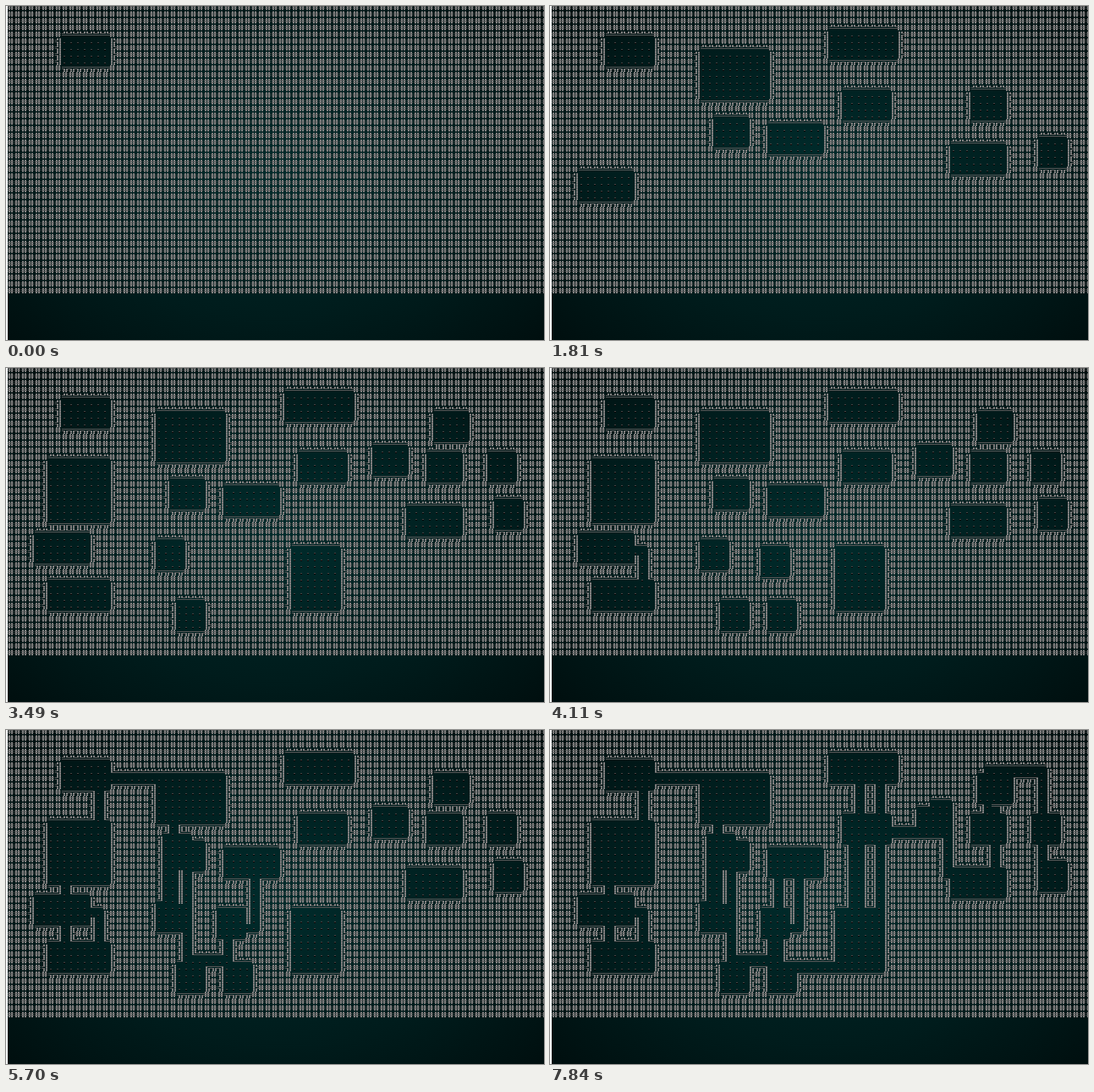
Write an HTML page with a canvas that moves like this. It is 636 px wide and 396 px high and loops after 8 s.

```html
<!DOCTYPE html>
<html lang="en">
<head>
<meta charset="utf-8">
<title>Dungeon generation</title>
<style>
  html, body { margin: 0; width: 100%; height: 100%; overflow: hidden; background: #000; }
  canvas {
    display: block;
    background: radial-gradient(640px 400px at 322px 198px, #002c2c, #001c1c 43%, #000);
  }
</style>
</head>
<body>
<canvas id="view" width="636" height="396"></canvas>
<script>
const ctx = document.getElementById('view').getContext('2d');
const COLS = 80, ROWS = 43, CELL = 8, LEFT = 2, TOP = -2, LOOP = 8000;

// The door is where the corridor chain passes; it lies mid-room unless offset.
function room(x, y, w, { h = 4, dx = w >> 1, dy = h >> 1 } = {}) {
  return { x, y, w, h, door: [x + dx, y + dy] };
}

// In the order of carving.
const rooms = [
  room(8, 5, 7, { dx: 5 }),
  room(22, 7, 10, { h: 7 }),
  room(41, 4, 10, { dx: 4 }),
  room(43, 13, 7, { dx: 1 }),
  room(24, 17, 5, { dx: -1, dy: -1 }),
  room(32, 18, 8),
  room(62, 13, 5, { dx: 3, dy: -1 }),
  room(59, 21, 8, { dx: -1, dy: 0 }),
  room(72, 20, 4, { dx: 0 }),
  room(4, 25, 8),
  room(25, 35, 4, { dx: 1, dy: -1 }),
  room(22, 26, 4),
  room(6, 32, 9, { dx: 7 }),
  room(42, 27, 7, { h: 9, dx: 6 }),
  room(71, 13, 4, { dx: 1 }),
  room(63, 7, 5, { dx: 1, dy: -1 }),
  room(6, 14, 9, { h: 9, dx: 2 }),
  room(54, 12, 5, { dy: -1 }),
  room(31, 27, 4, { dx: 1 }),
  room(32, 35, 4, { dx: 1, dy: 0 })
];

// Corridors link the doors from left to right across the map.
const doors = [...rooms].sort((a, b) => a.x - b.x).map(r => r.door);
const corridors = doors.slice(1).map((door, i) => [doors[i], door]);

// One carving about every 207 ms, snapped to ticks: mostly three, at times two.
const TICK = 76.1, FIRST = 135;
const total = rooms.length + corridors.length;
const times = Array.from({ length: total - 1 }, (_, k) =>
  FIRST + TICK * (3 * k - Math.floor((k + 0.43) / 3.41)));

// Ink that alternates between dark even rows and bright odd rows.
function scanInk(dark, bright) {
  const tile = document.createElement('canvas');
  tile.width = 1;
  tile.height = 2;
  const t = tile.getContext('2d');
  [dark, bright].forEach((color, y) => {
    t.fillStyle = color;
    t.fillRect(0, y, 1, 1);
  });
  return ctx.createPattern(tile, 'repeat');
}
const wallInk = scanInk('#575757', '#969696');
const floorInk = scanInk('#050505', '#444444');

function carveRoom(floor, r) {
  for (let y = r.y; y < r.y + r.h; y++)
    for (let x = r.x; x < r.x + r.w; x++) floor[y * COLS + x] = 1;
}

// Sideways first, then up or down.
function carveCorridor(floor, [[x, y], [endX, endY]]) {
  while (x !== endX || y !== endY) {
    if (x !== endX) x += Math.sign(endX - x);
    else y += Math.sign(endY - y);
    floor[y * COLS + x] = 1;
  }
}

function drawHash(px, py) {
  for (const x of [1, 4]) ctx.fillRect(px + x, py, 2, 7);
  for (const y of [2, 4]) ctx.fillRect(px, py + y, 7, 1);
}

// Double-line wall: solid arms towards neighbours, then hollowed out.
function drawWall(px, py, n, s, w, e) {
  if (!w && !e) n = s = true;
  if (!n && !s) w = e = true;
  if (n) ctx.fillRect(px + 2, py, 5, 5);
  if (s) ctx.fillRect(px + 2, py + 2, 5, 6);
  if (w) ctx.fillRect(px, py + 2, 7, 3);
  if (e) ctx.fillRect(px + 2, py + 2, 6, 3);
  if (n) ctx.clearRect(px + 4, py, 1, 4);
  if (s) ctx.clearRect(px + 4, py + 3, 1, 5);
  if (w) ctx.clearRect(px, py + 3, 5, 1);
  if (e) ctx.clearRect(px + 4, py + 3, 4, 1);
}

function draw(steps) {
  const floor = new Uint8Array(COLS * ROWS);
  rooms.slice(0, steps).forEach(r => carveRoom(floor, r));
  corridors.slice(0, Math.max(0, steps - rooms.length)).forEach(c => carveCorridor(floor, c));
  const wall = (x, y) => !floor[y * COLS + x];

  ctx.clearRect(0, 0, 636, 396);
  for (let y = 0; y < ROWS; y++) {
    for (let x = 0; x < COLS; x++) {
      const px = LEFT + x * CELL, py = TOP + y * CELL;
      if (!wall(x, y)) {
        ctx.fillStyle = floorInk;
        ctx.fillRect(px + 2, py + 5, 2, 2);
        continue;
      }
      ctx.fillStyle = wallInk;
      const edge = x < 1 || y < 1 || x > COLS - 2 || y > ROWS - 2;
      const sides = edge ? [] : [wall(x, y - 1), wall(x, y + 1), wall(x - 1, y), wall(x + 1, y)];
      if (sides.every(Boolean)) drawHash(px, py);
      else drawWall(px, py, ...sides);
    }
  }
  ctx.fillStyle = '#fff';
  ctx.fillRect(0, 0, LEFT, 396);
}

let shown = 0;
const start = performance.now();
function tick() {
  const now = (performance.now() - start) % LOOP;
  const steps = 1 + times.filter(t => t <= now).length;
  if (steps !== shown) draw(shown = steps);
  requestAnimationFrame(tick);
}
tick();
</script>
</body>
</html>
```
